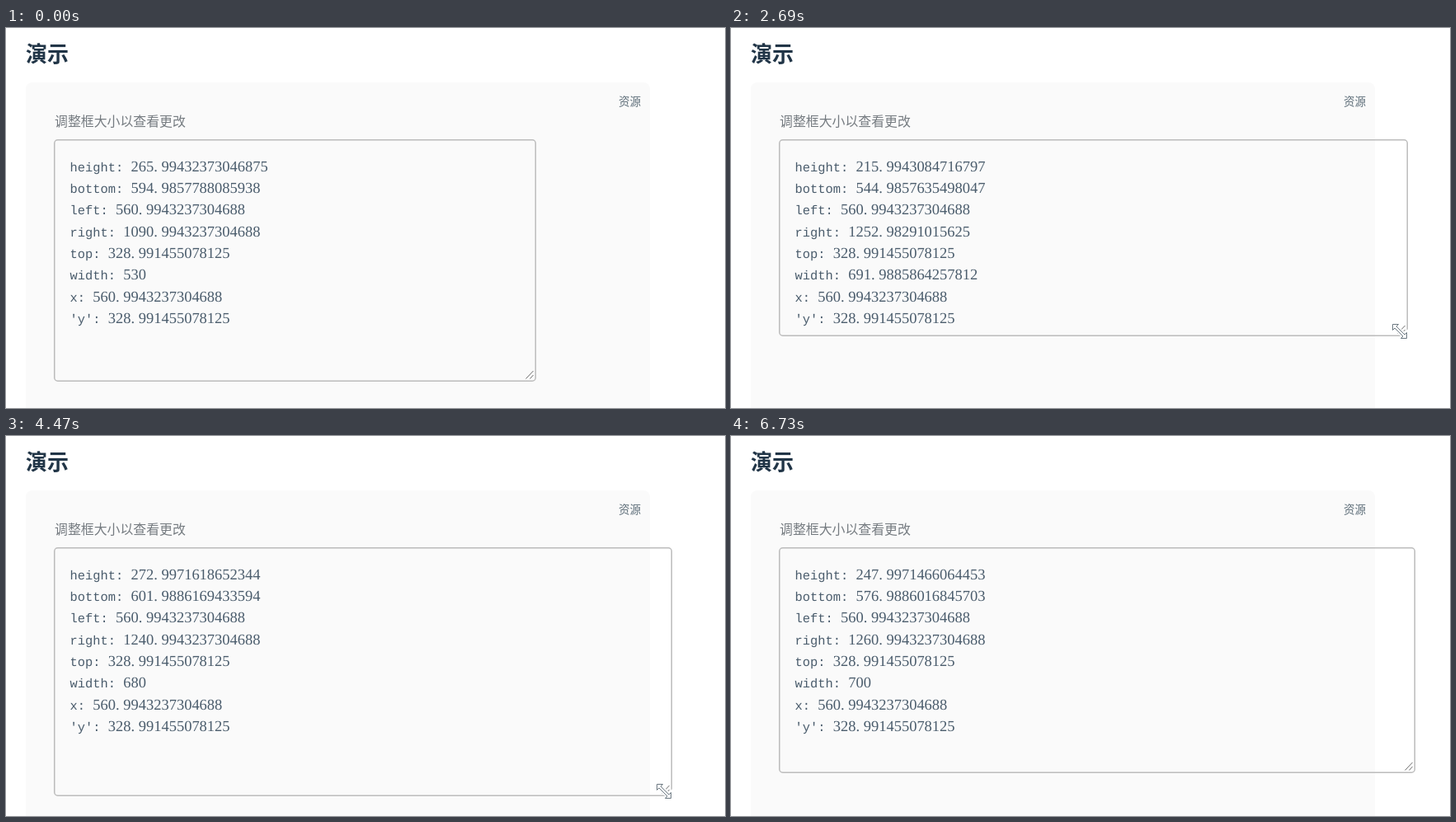
An HTML page that plays this animation: 872 px wide and 461 px high, repeating every 7.85 s.

```html
<!DOCTYPE html>
<html lang="zh-CN">
<head>
<meta charset="utf-8">
<title>演示</title>
<style>
  html, body { margin: 0; height: 100%; overflow: hidden; background: #fff; }
  svg { display: block; }
  .zh { font-family: "Noto Sans CJK SC", "Noto Sans CJK", sans-serif; }
  #lines { font: 15.4px "Liberation Mono", monospace; fill: #4a5c6c; white-space: pre; text-rendering: geometricPrecision; }
  .digits, .dot { font: 18.48px "Liberation Serif", serif; }
  .dot { letter-spacing: .25em; }
  .cursor { stroke: #5d6a74; stroke-width: .9; stroke-linejoin: round; fill: #fff; }
</style>
</head>
<body>
<svg width="872" height="461" viewBox="0 0 872 461">
  <rect x="24" y="66" width="757" height="420" rx="8" fill="#fafafa"/>
  <g class="zh">
    <text x="24" y="41" font-size="26" font-weight="700" fill="#213547">演示</text>
    <text x="59" y="119" font-size="15.9" fill="#757b80">调整框大小以查看更改</text>
    <text x="743" y="94" font-size="13.5" fill="#5f6f7a">资源</text>
  </g>
  <rect id="frame" x="58.75" y="135.75" rx="4" fill="none" stroke="#bcbcbc" stroke-width="1.5"/>
  <svg id="lines" x="58" y="135" width="600"></svg>
  <path id="grip" d="M-12.5-3.5l9-9.5M-7.5-3.5l4-4.5" stroke="#6c6c6c" fill="none"/>
  <path id="beam" class="cursor" d="M-3-8.5H3M-3 8.5H3M0-8.5V8.5"/>
  <g id="resize">
    <use href="#arrows" stroke="#fff" stroke-width="4"/>
    <path id="arrows" fill="#fff" d="M-8.5-8.5H-1.5L-4-6L6 4L8.5 1.5V8.5H1.5L4 6L-6-4L-8.5-1.5Z"/>
    <use href="#arrows" class="cursor"/>
  </g>
  <path id="pointer" class="cursor" d="M.5.5V16.5L4.2 13L6.6 18.5L9 17.5L6.6 12H11.5Z"/>
</svg>
<script>
const $ = id => document.getElementById(id);
const LOOP = 7850, STEP = 70, ZOOM = 1.1, LINE = 26.3;

// Each drag of the corner: start, end, final width, final height
const drags = [
  [1010, 1430, 541, 222],
  [1500, 1640, 583, 199],
  [1710, 2200, 667, 182],
  [2270, 2690, 692, 216],
  [2760, 3320, 692, 260],
  [3650, 4070, 692, 281],
  [4330, 4960, 652, 254],
  [5160, 5580, 694, 246],
  [5910, 6250, 700, 248]
];

const mix = (a, b, p) => a + (b - a) * p;

// Progress in whole steps; the first step is taken at start, the last at end
function progress(t, start, end) {
  const steps = Math.round((end - start) / STEP) + 1;
  const taken = Math.floor((t - start) / STEP) + 1;
  return Math.max(0, Math.min(1, taken / steps));
}

function sizeAt(t) {
  let size = [530, 266];
  for (const [start, end, ...goal] of drags) {
    const p = progress(t, start, end);
    size = size.map((v, i) => mix(v, goal[i], p));
  }
  return size.map(Math.round);
}

// Layout lengths are whole 64ths of a zoomed pixel, reported as 32-bit floats
const inverseZoom = Math.fround(1 / Math.fround(ZOOM));
const measure = n => Math.fround(Math.floor(n * ZOOM * 64 + 1e-6) / 64 * inverseZoom);

const markUp = text => text
  .replace(/\./g, '<tspan class="dot">.</tspan>')
  .replace(/\d+/g, '<tspan class="digits">$&</tspan>');

function report(w, h) {
  const left = measure(561), top = measure(329), width = measure(w), height = measure(h);
  const entries = { height, bottom: top + height, left, right: left + width, top, width, x: left, "'y'": top };
  return Object.entries(entries).map(([name, value], row) =>
    `<text x="19.6" y="${38.8 + LINE * row}">${markUp(`${name}: ${value}`)}</text>`).join('');
}

function place(id, x, y, visible = true) {
  $(id).setAttribute('transform', `translate(${x} ${y})`);
  $(id).style.display = visible ? '' : 'none';
}

let shown = '';
function draw(t) {
  const [w, h] = sizeAt(t);
  const boxW = Math.floor(w * ZOOM + 0.01) + 2, boxH = Math.floor(h * ZOOM + 0.01) + 2;
  const right = 58 + boxW, bottom = 135 + boxH;
  $('frame').setAttribute('width', boxW - 1.5);
  $('frame').setAttribute('height', boxH - 1.5);
  $('lines').setAttribute('height', boxH - 1.5);
  const text = report(w, h);
  if (text !== shown) $('lines').innerHTML = shown = text;

  const enter = progress(t, 130, 620), leave = progress(t, 6450, 6660);
  place('grip', right, bottom);
  place('beam', mix(400, right - 10, enter), bottom - 6 - 9 * Math.sin(Math.PI * enter), t >= 130 && t < 620);
  place('resize', right - 10, bottom - 6, t >= 620 && t < 6450);
  place('pointer', right - 18, mix(bottom - 8, 450, leave), t >= 6450 && t < 6730);
}

const begin = performance.now();
function tick() {
  draw((performance.now() - begin) % LOOP);
  requestAnimationFrame(tick);
}
tick();
</script>
</body>
</html>
```
